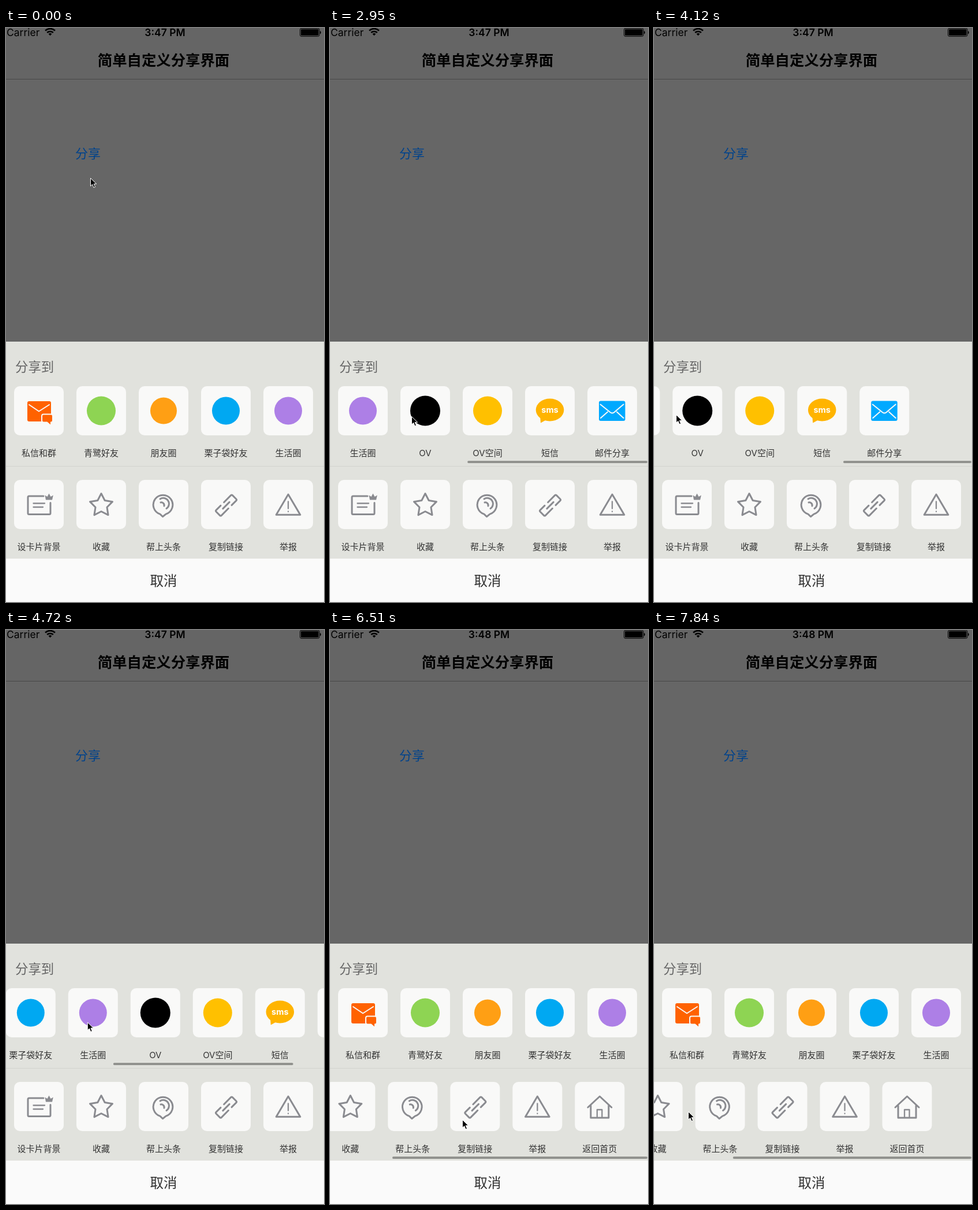
These frames come from a looping animation (551 px wide and 992 px high, 7.99 s). An HTML page:

```html
<!DOCTYPE html>
<html lang="zh-CN">
<head>
<meta charset="utf-8">
<title>分享</title>
<style>
html, body { margin: 0; height: 100%; overflow: hidden; background: #666; }
svg { display: block; position: fixed; inset: 0; width: 100%; height: 100%; }
text { font-family: Inter, "Noto Sans CJK SC", "Noto Sans CJK", sans-serif; }
.mid { text-anchor: middle; }
.label { font-size: 15px; fill: #333; text-anchor: middle; }
.line { fill: none; stroke: #8a8b90; stroke-width: 3; stroke-linecap: round; stroke-linejoin: round; }
.thin { stroke-width: 2.3; }
.flap { fill: none; stroke: #f9f9f8; stroke-width: 2; stroke-linecap: round; stroke-linejoin: round; }
</style>
</head>
<body>
<svg id="stage" viewBox="0 0 551 992" preserveAspectRatio="none">
  <rect width="551" height="992" fill="#666"/>
  <rect width="551" height="88" fill="#656565"/>
  <rect y="88" width="551" height="1" fill="#474747"/>
  <text x="1" y="14" font-size="17.5">Carrier</text>
  <g fill="none" stroke="#000" stroke-width="2.6">
    <path d="M68 4.5A12.5 12.5 0 0 1 85 4.5M71.2 8A8 8 0 0 1 81.8 8"/>
    <path d="M73.6 10.2A4.4 4.4 0 0 1 79.4 10.2L76.5 13.2Z" fill="#000" stroke="none"/>
  </g>
  <text id="clock" class="mid" x="275.5" y="14" font-size="17.5" font-weight="600">3:47 PM</text>
  <rect x="509.5" y=".5" width="33.5" height="14" rx="2.5" fill="none" stroke="#000"/>
  <rect x="511" y="2" width="30.5" height="11" rx="1.2"/>
  <path d="M544 5a3 3 0 0 1 0 5.5Z"/>
  <text class="mid" x="273" y="64.5" font-size="25.4" font-weight="700">简单自定义分享界面</text>
  <text x="120" y="225.3" font-size="22" fill="#00438c">分享</text>

  <rect y="542" width="551" height="375" fill="#e1e2dd"/>
  <text x="16" y="594" font-size="22.4" fill="#666">分享到</text>
  <rect y="757" width="551" height="1" fill="#d3d4cf"/>
  <g id="rows"></g>
  <rect y="917" width="551" height="75" fill="#fafafa"/>
  <text class="mid" x="273" y="963.5" font-size="23.5" fill="#333">取消</text>
  <path id="cursor" d="M.5 .5V14.2L3.7 11.2L6 16.8L8.5 15.7L6.2 10.4H10.7Z" stroke="#fff"/>
</svg>
<script>
const PITCH = 108, WIDTH = 551, CARD = '#f9f9f8';
const $ = id => document.getElementById(id);
const clamp = (v, lo, hi) => Math.min(hi, Math.max(lo, v));
const disc = (color, r) => `<circle r="${r}" fill="${color}"/>`;
const line = (d, extra = '') => `<path class="line ${extra}" d="${d}"/>`;
const flap = d => `<path class="flap" d="${d}"/>`;

const starPath = 'M' + Array.from({ length: 10 }, (_, i) => {
  const r = i % 2 ? 10.5 : 20.5, a = i * Math.PI / 5;
  return `${(r * Math.sin(a)).toFixed(2)} ${(1.5 - r * Math.cos(a)).toFixed(2)}`;
}).join('L') + 'Z';

const shareItems = [
  ['私信和群', `<rect x="-20" y="-16.5" width="41" height="35" rx="3" fill="#ff6200"/>
    ${flap('M-17 -10.5L0 1L18 -10.5')}
    <path d="M8 6H21Q24 6 24 9V17Q24 20 21 20V26L14 20H8Q5 20 5 17V9Q5 6 8 6Z"
      fill="#ff6200" stroke="${CARD}" stroke-width="2"/>`],
  ['青鹭好友', disc('#8ed453', 25)],
  ['朋友圈', disc('#ff9f14', 23)],
  ['栗子袋好友', disc('#00a8f2', 24)],
  ['生活圈', disc('#ad7fe6', 24)],
  ['OV', disc('#000', 26)],
  ['OV空间', disc('#ffc000', 25)],
  ['短信', `<ellipse cy="-1.5" rx="24.3" ry="19.5" fill="#ffb400"/>
    <path d="M-17 8L-16 21L-5 15Z" fill="#ffb400"/>
    <text class="mid" y="3.5" font-size="14.5" font-weight="700" fill="#fff">sms</text>`],
  ['邮件分享', `<rect x="-23" y="-17" width="45.5" height="34.5" rx="3" fill="#00a9ff"/>
    ${flap('M-20.5 -11L-3 3Q0 5 3 3L19.5 -11M-20 12.5L-8 2M19.5 12.5L8 2')}`]
];

const toolItems = [
  ['设卡片背景', line('M8 -14.5H-17Q-19 -14.5 -19 -12.5V15Q-19 17 -17 17H18Q20 17 20 15V-3') +
    line('M-9.5 -2H10M-9.5 4.5H7', 'thin') +
    '<path d="M12 -8L10.5 -16L14.5 -13.5L17.5 -19L20.5 -13.5L24.8 -16L23 -8Z" fill="#8a8b90"/>'],
  ['收藏', line(starPath)],
  ['帮上头条', line('M-6 16.6A16.8 16.8 0 1 1 4 16.6L-1.5 21Z') +
    line('M-6 -9.5A9.5 9.5 0 0 1 5 7M-5 -3.5A5 5 0 0 1 1 2.5')],
  ['复制链接', `<g transform="translate(.5 1.5) rotate(-45)">${
    line('M-1 6.5H-18Q-20 6.5 -20 4.5V-4.5Q-20 -6.5 -18 -6.5H-7') +
    line('M1 -6.5H18Q20 -6.5 20 -4.5V4.5Q20 6.5 18 6.5H7M-8 0H8')}</g>`],
  ['举报', line('M0 -17.5L20.8 17.7H-20.8Z') + line('M0 -5V7M0 12V12.3', 'thin')],
  ['返回首页', line('M-20.5 1.5L0 -17.5L20.5 1.5M-15.5 -2V19.5H15.5V-2') +
    line('M-4.5 19V5.5H4V19', 'thin')]
];

// Pointer path: [step, x, y]
const path = [
  [0, 146, 259], [3, 187, 470], [6, 146, 647], [9, 153, 650], [12, 354, 657], [14, 254, 659],
  [16, 141, 668], [20, 141, 671], [25, 233, 668], [28, 38, 668], [31, 47, 672],
  [36, 516, 700], [41, 378, 835], [44, 229, 846], [49, 160, 838], [53, 59, 832]
];
function pointer(step) {
  const i = clamp(path.findIndex(k => k[0] >= step), 1, path.length - 1);
  const [s, x, y] = path[i - 1], [s2, x2, y2] = path[i];
  const p = (step - s) / (s2 - s);
  return [x + (x2 - x) * p, y + (y2 - y) * p];
}

const SETTLE = 4;
const rubber = d => WIDTH * (1 - 1 / (1 + .55 * d / WIDTH));

// A drag is [first step, last step, resting offset]; the list follows the pointer, then settles.
function scroller(drags, max) {
  const bend = v => v < 0 ? -rubber(-v) : v > max ? max + rubber(v - max) : v;
  return step => {
    const i = drags.findLastIndex(d => d[0] <= step);
    if (i < 0) return 0;
    const [start, end, rest] = drags[i];
    const from = i ? drags[i - 1][2] : 0;
    const offset = bend(from + pointer(start)[0] - pointer(Math.min(step, end))[0]);
    const p = clamp((step - end) / SETTLE, 0, 1);
    return rest + (offset - rest) * (1 - p) ** 3;
  };
}

function makeRow(items, top, drags) {
  const total = items.length * PITCH + 11, max = total - WIDTH;
  const barLen = WIDTH * WIDTH / total + 3;
  const cards = items.map(([name, icon], i) => `<g transform="translate(${57 + i * PITCH} ${top + 42.5})">
    <rect x="-43" y="-42.5" width="86" height="85" rx="10" fill="${CARD}"/>${icon}
    <text class="label" y="78">${name}</text></g>`).join('');
  const row = document.createElementNS('http://www.w3.org/2000/svg', 'g');
  row.innerHTML = `<g>${cards}</g><rect y="${top + 129}" height="4" rx="2" fill="#91928e"/>`;
  $('rows').append(row);
  const [list, bar] = row.children;
  const scroll = scroller(drags, max);
  const shown = drags[0][0], hidden = drags.at(-1)[1] + 3;
  return step => {
    const offset = scroll(step), inside = clamp(offset, 0, max);
    list.setAttribute('transform', `translate(${-offset} 0)`);
    bar.setAttribute('x', -3 + (553 - barLen) * inside / max + Math.max(0, offset - max));
    bar.setAttribute('width', barLen - Math.abs(offset - inside));
    bar.setAttribute('opacity', clamp(Math.min(step - shown, (hidden - step) / 2), 0, 1));
  };
}
const rows = [
  makeRow(shareItems, 619, [[9, 11, 0], [12, 16, 432], [25, 28, 432], [31, 36, 0]]),
  makeRow(toolItems, 781, [[41, 45, 108], [49, 53, 108]])
];

const LOOP = 7990, STEP = 147.8, LAST = 53, CLOCK_STEP = 42;
function draw(now) {
  const step = Math.min(LAST, Math.floor((now % LOOP + 25) / STEP));
  $('cursor').setAttribute('transform', `translate(${pointer(step).join(' ')})`);
  rows.forEach(drawRow => drawRow(step));
  $('clock').textContent = step < CLOCK_STEP ? '3:47 PM' : '3:48 PM';
}
const began = performance.now();
function tick() {
  draw(performance.now() - began);
  requestAnimationFrame(tick);
}
tick();
</script>
</body>
</html>
```
